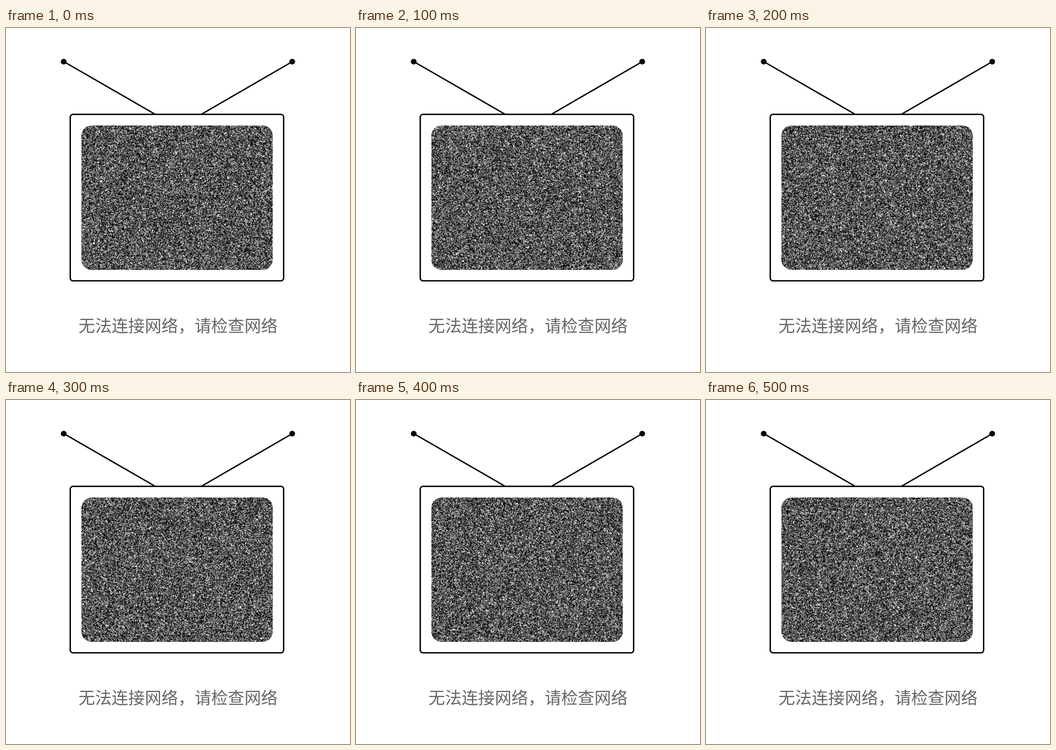
Animation of 748x748 px, one loop 0.6 s. Source, as an HTML page with a canvas:

```html
<!DOCTYPE html>
<html lang="zh-CN">
<head>
<meta charset="utf-8">
<title>无法连接网络</title>
<style>
  html, body { margin: 0; width: 100%; height: 100%; overflow: hidden; background: #fff; }
  svg, canvas { position: absolute; display: block; }
  svg { left: 0; top: 0; }
  canvas { left: 164px; top: 212px; border-radius: 22px; }
  text { font: 400 36.1px "Noto Sans CJK SC", "Noto Sans CJK", sans-serif; fill: #666; }
</style>
</head>
<body>
<svg width="748" height="748" viewBox="0 0 748 748">
  <g fill="none" stroke="#000" stroke-width="3">
    <path d="M125.5 73 L323.2 187 M622.4 73.2 L426 187"/>
    <rect x="139.7" y="187.7" width="464" height="362" rx="6"/>
  </g>
  <circle cx="125.5" cy="73.2" r="6.2"/>
  <circle cx="622.3" cy="73.2" r="6.2"/>
  <text x="157.6" y="660.7">无法连接网络，请检查网络</text>
</svg>
<canvas id="screen" width="416" height="314"></canvas>
<script>
const STEP = 100, COUNT = 6;
const canvas = document.getElementById('screen');
const ctx = canvas.getContext('2d');
const W = canvas.width, H = canvas.height;

function seeded(seed) {
  return () => {
    seed = (seed + 0x6D2B79F5) | 0;
    let t = Math.imul(seed ^ (seed >>> 15), seed | 1);
    t ^= t + Math.imul(t ^ (t >>> 7), t | 61);
    return ((t ^ (t >>> 14)) >>> 0) / 4294967296;
  };
}

// Random values softened with a 1-3-1 kernel, then stretched towards black.
function makeStatic(seed) {
  const rand = seeded(seed), w = W + 2, h = H + 2;
  const raw = Float32Array.from({ length: w * h }, rand);
  const rows = new Float32Array(w * h).fill(0.5);
  for (let i = 1; i < raw.length - 1; i++) {
    rows[i] = (raw[i - 1] + 3 * raw[i] + raw[i + 1]) / 5;
  }
  const img = ctx.createImageData(W, H);
  for (let y = 0; y < H; y++) {
    for (let x = 0; x < W; x++) {
      const i = (y + 1) * w + x + 1;
      const mean = (rows[i - w] + 3 * rows[i] + rows[i + w]) / 5;
      const level = Math.min(1, Math.max(0, 0.45 + (mean - 0.5) * 1.65));
      const p = (y * W + x) * 4;
      img.data[p] = img.data[p + 1] = img.data[p + 2] = 255 * level ** 1.4;
      img.data[p + 3] = 255;
    }
  }
  return img;
}

const pictures = Array.from({ length: COUNT }, (_, i) => makeStatic(101 + i * 7919));
let shown = -1;

function draw(time) {
  const i = Math.floor(time / STEP) % COUNT;
  if (i !== shown) ctx.putImageData(pictures[shown = i], 0, 0);
}

const start = performance.now();
function tick() {
  draw(performance.now() - start);
  requestAnimationFrame(tick);
}
tick();
</script>
</body>
</html>
```
